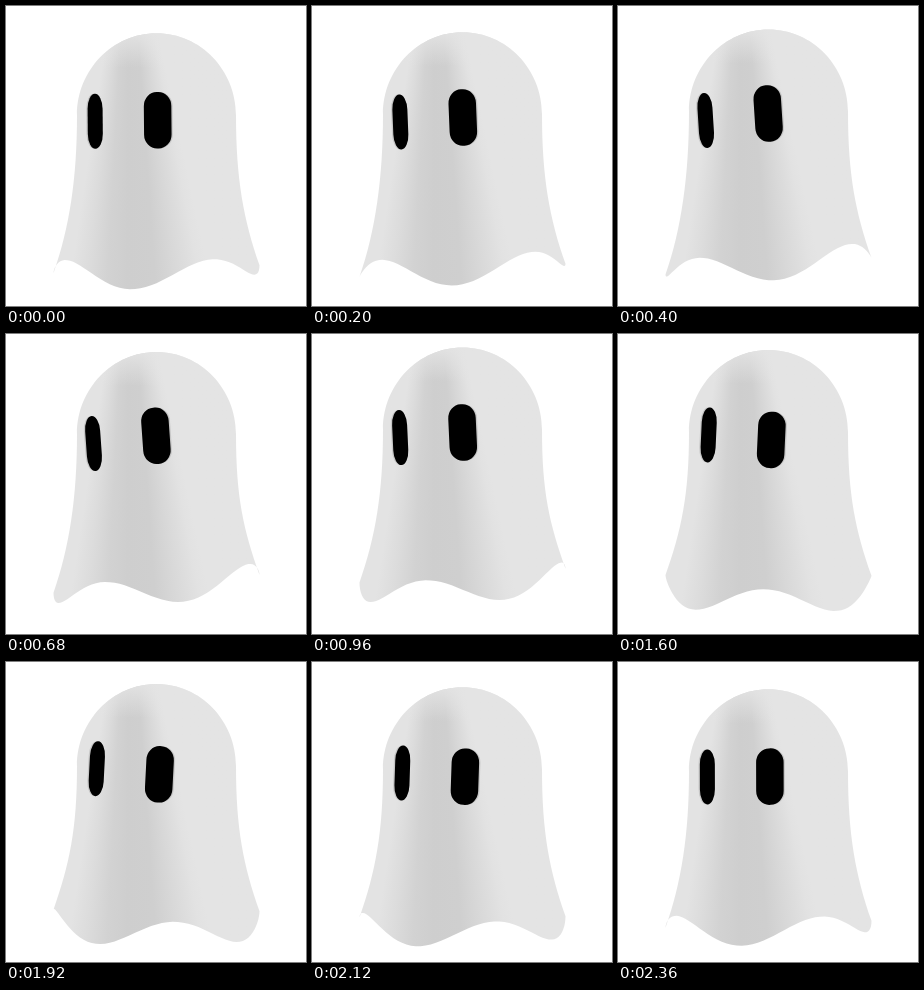
An HTML page with a canvas that plays this animation: 300 px wide and 300 px high, repeating every 2400 ms.

```html
<!DOCTYPE html>
<html>
<head>
<meta charset="utf-8">
<style>
html, body { margin: 0; width: 100%; height: 100%; overflow: hidden; background: #fff; }
canvas { display: block; width: 300px; height: 300px; }
</style>
</head>
<body>
<canvas id="stage"></canvas>
<script>
const LOOP = 2400, STEP = 40;
const RAD = Math.PI / 180;
const CENTER = 150.5, HALF = 79.5, DOME = 82;
const SKIN = '#e4e4e4';

const canvas = document.getElementById('stage');
const ratio = window.devicePixelRatio || 1;
canvas.width = canvas.height = 300 * ratio;
const ctx = canvas.getContext('2d');

// The hem is a ring seen from slightly above, with four ripples travelling round it.
function hemPoint(angle, phase) {
  const crest = -14 + phase / RAD / 4 + 4 * Math.sin(phase);
  const lift = 251 + 8 * Math.cos(phase + 50 * RAD);
  const roll = -4 - 5 * Math.sin(phase);
  const a = angle * RAD;
  return [
    CENTER + 103 * Math.sin(a),
    lift + 14 * Math.cos(a) + roll * Math.sin(a) + 12.5 * Math.cos(4 * (angle - crest) * RAD)
  ];
}

function bodyPath(top, phase) {
  const shoulder = top + DOME, k = 0.5523;
  const left = CENTER - HALF, right = CENTER + HALF;
  const [tipLX, tipLY] = hemPoint(-90, phase);
  const [tipRX, tipRY] = hemPoint(90, phase);
  ctx.beginPath();
  ctx.moveTo(left, shoulder);
  ctx.bezierCurveTo(left, top + 145, tipLX + 16, tipLY - 45, tipLX, tipLY);
  for (let angle = -90; angle <= 90; angle += 3) ctx.lineTo(...hemPoint(angle, phase));
  ctx.bezierCurveTo(tipRX - 16, tipRY - 45, right, top + 145, right, shoulder);
  ctx.bezierCurveTo(right, shoulder - DOME * k, CENTER + HALF * k, top, CENTER, top);
  ctx.bezierCurveTo(CENTER - HALF * k, top, left, shoulder - DOME * k, left, shoulder);
  ctx.closePath();
}

// A soft shadow down the front that widens towards the hem.
function frontShade(top) {
  const shade = ctx.createConicGradient(78 * RAD, 122, top - 141);
  const stops = [[0, SKIN], [1.5, '#e2e2e2'], [5, '#d8d8d8'], [8, '#cfcfcf'], [12, '#cecece'],
                 [15, '#d2d2d2'], [18, '#dcdcdc'], [20.5, '#e3e3e3'], [360, SKIN]];
  for (const [degrees, color] of stops) shade.addColorStop(degrees / 360, color);
  return shade;
}

function topLight(top) {
  const light = ctx.createLinearGradient(0, top, 0, top + 34);
  light.addColorStop(0, 'rgba(228,228,228,0.9)');
  light.addColorStop(1, 'rgba(228,228,228,0)');
  return light;
}

function pill(w, h, radius, color) {
  ctx.fillStyle = color;
  ctx.beginPath();
  ctx.roundRect(-w / 2, -h / 2, w, h, radius);
  ctx.fill();
}

function eye(x, y, w, h, radius, tilt, rim) {
  ctx.save();
  ctx.translate(x + rim, y);
  ctx.rotate(tilt);
  pill(w + 1, h, radius, '#c6c6c6');
  ctx.translate(-rim, 0);
  pill(w, h, radius, '#000');
  ctx.restore();
}

function draw(now) {
  const t = Math.floor(now % LOOP / STEP) * STEP;
  const phase = t / LOOP * 2 * Math.PI;
  const bob = 7.6 * Math.cos(phase), sway = Math.sin(phase);
  const top = 19.7 + bob;

  ctx.setTransform(ratio, 0, 0, ratio, 0, 0);
  ctx.fillStyle = '#fff';
  ctx.fillRect(0, 0, 300, 300);
  bodyPath(top, phase);
  for (const paint of [frontShade(top), topLight(top)]) {
    ctx.fillStyle = paint;
    ctx.fill();
  }

  const drop = -1 - 7 * sway;
  const eyeY = 107.2 + bob, tilt = drop * 0.009;
  eye(89.2 - 1.7 * sway, eyeY - drop / 2, 15, 55, { x: 7.5, y: 15 }, tilt, -0.8);
  eye(151.7 - 1.8 * sway, eyeY + drop / 2, 27.5, 56.5, { x: 13, y: 14 }, tilt, 0.8);
}

const start = performance.now();
function tick() {
  draw(performance.now() - start);
  requestAnimationFrame(tick);
}
tick();
</script>
</body>
</html>
```
